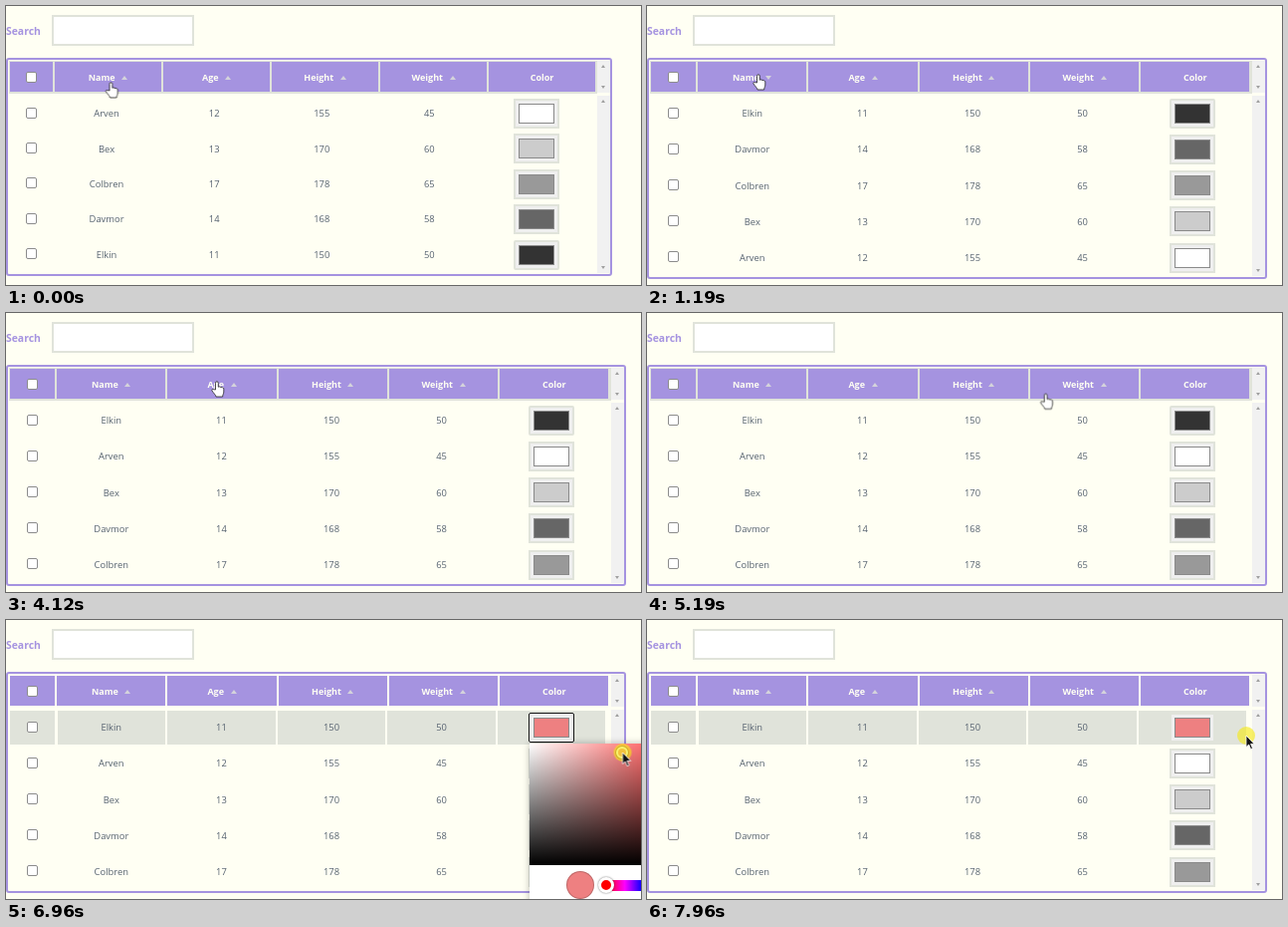
Animation of 638x280 px, one loop 8000 ms. Source, as an HTML page:

```html
<!DOCTYPE html>
<html lang="en">
<head>
<meta charset="utf-8">
<title>Sortable table</title>
<style>
  :root { --violet: #a593e0; --ivory: #fffff3; --mist: #e0e3da; --slate: #566270; }
  * { box-sizing: border-box; }
  html, body { margin: 0; width: 100%; height: 100%; overflow: hidden; background: var(--ivory); }
  #stage {
    --w: 609px; --h: 219px;
    --hs: 49px; --hp: 109px;
    --bs: 48px; --bp: 108.1px;
    --y: 91px; --rp: 35.4px;
    --pick: #333; --px: 0px; --py: 97px;
    position: relative; width: 638px; height: 280px; overflow: hidden;
    font: 9.4px/1 "Open Sans", "Noto Sans", sans-serif; color: var(--slate);
    animation: layout 8s step-end infinite, pick 8s step-end infinite;
  }
  #stage div, #stage svg, #stage i { position: absolute; }
  @keyframes layout {
    14.875% { --w: 622.5px; --h: 222px; --hs: 51px; --hp: 111.3px; --bs: 51.5px; --bp: 110.6px; --y: 91px; --rp: 36.15px; }
  }
  @keyframes pick { 87% { --pick: #ee8081; --px: 93px; --py: 9px; } }

  .label { left: 0; top: 17.5px; font-size: 10.4px; line-height: 14px; font-weight: 700; color: var(--violet); }
  .search { left: 46px; top: 9px; width: 143px; height: 31px; background: #fff; border: 2px solid var(--mist); }
  .frame { left: 0; top: 52px; width: var(--w); height: var(--h); border: 2px solid var(--violet); border-radius: 3px; }

  .head { left: 3px; top: 55px; width: calc(var(--w) - 18px); height: 33px; background: var(--mist);
    animation: leave 8s step-end infinite; }
  @keyframes leave { 66% { background: transparent; } }

  .cell { display: flex; align-items: center; justify-content: center; }
  .th { top: 56px; height: 30px; left: calc(var(--hs) + var(--hp) * var(--c)); width: calc(var(--hp) - 2px);
    background: var(--violet); color: var(--ivory); font-size: 9px; font-weight: 700; }
  .th.check, .td.check { left: 4px; width: calc(var(--hs) - 6px); }
  .th b { margin: 2px 0 0 6.5px; border: 3.5px solid transparent; border-top: 0; border-bottom: 4px solid var(--mist); opacity: .8; }
  .th.name b { animation: flip 8s step-end infinite; }
  @keyframes flip { 14.875% { transform: scaleY(-1); } 29% { transform: none; } }

  .row { --i: var(--a); left: 0; top: calc(var(--y) + var(--rp) * var(--i)); width: 100%; height: 34px;
    animation: sort 8s step-end infinite; }
  @keyframes sort { 14.875% { --i: var(--b); } 29% { --i: var(--a); } 51.5% { --i: var(--d); } }
  .td { top: 0; height: 34px; left: calc(var(--bs) + var(--bp) * var(--c)); width: calc(var(--bp) - 2px); }
  .last .td { animation: hover 8s step-end infinite; }
  @keyframes hover {
    66.25% { background: var(--mist); }
    94.5% { background: transparent; }
    95.8% { background: var(--mist); }
  }
  .box { width: 11px; height: 11px; background: #fff; border: 1px solid #8c8c8c; border-radius: 2px; }
  .td .box { margin-top: -2px; }
  .well { width: 46px; height: 30px; padding: 3px; background: #efefef; border: 2px solid var(--mist); flex: none; }
  .well span { display: block; height: 100%; border: 1px solid #8a8a8a; background: var(--k); }
  .last .well { border-radius: 2px; outline: 1.5px solid transparent; outline-offset: -1px; animation: focus 8s step-end infinite; }
  @keyframes focus {
    71.25% { outline-color: #101010; border-color: #fff; }
    99.5% { outline-color: transparent; border-color: var(--mist); }
  }

  .bar { left: calc(var(--w) - 15px); width: 13px; background: #f1f1f1; }
  .bar i { left: 4px; border: 2.5px solid transparent; }
  .bar .up { top: 4px; border-top: 0; border-bottom: 3px solid #a0a0a0; }
  .bar .down { bottom: 4px; border-bottom: 0; border-top: 3px solid #a0a0a0; }

  .popup { left: 526px; top: 124px; width: 202px; height: 260px; opacity: 0; box-shadow: 0 0 7px rgba(0, 0, 0, .28);
    animation: show 8s step-end infinite; }
  @keyframes show { 73.5% { opacity: 1; } 99.5% { opacity: 0; } }
  .panel { inset: 0; background: #fff; overflow: hidden; opacity: 0; animation: fill 8s step-end infinite; }
  @keyframes fill { 74.375% { opacity: 1; } }
  .shade { left: 0; top: 0; width: 202px; height: 122px; overflow: hidden;
    background: linear-gradient(transparent, #000), linear-gradient(90deg, #fff, #f00); }
  .ring { left: var(--px); top: var(--py); width: 12px; height: 12px; margin: -6px; border-radius: 50%;
    background: var(--pick); border: 2px solid #fff; box-shadow: 0 0 0 1px rgba(0, 0, 0, .4); }
  .dot { left: 37px; top: 128px; width: 28px; height: 28px; border-radius: 50%; background: var(--pick); border: 1px solid rgba(0, 0, 0, .2); }
  .hue { left: 77px; top: 137px; width: 110px; height: 11px; border-radius: 6px;
    background: linear-gradient(90deg, #f00, #f0f 17%, #00f 33%, #0ff 50%, #0f0 67%, #ff0 83%, #f00); }
  .knob { left: 69px; top: 134px; width: 16px; height: 16px; border-radius: 50%; background: #f00; border: 3px solid #fff;
    box-shadow: 0 0 2px rgba(0, 0, 0, .6); }

  .pointer { left: 0; top: 0; animation: move 8s linear infinite; }
  @keyframes move {
    0%, 2.25% { transform: translate(105.5px, 77px); }
    5% { transform: translate(158px, 83px); }
    7% { transform: translate(183px, 80px); animation-timing-function: ease-out; }
    11.75%, 33% { transform: translate(112px, 69px); animation-timing-function: ease-in-out; }
    35.875%, 36.75% { transform: translate(204px, 69px); animation-timing-function: ease-out; }
    40.75%, 61.5% { transform: translate(212px, 69px); animation-timing-function: ease-in; }
    64.5% { transform: translate(380px, 79px); }
    66% { transform: translate(460px, 88px); animation-timing-function: ease-out; }
    70.5%, 79.7% { transform: translate(557px, 109px); animation-timing-function: ease-out; }
    83%, 92.5% { transform: translate(619.5px, 133px); animation-timing-function: ease-in-out; }
    97.25%, 100% { transform: translate(602px, 116px); }
  }
  .click { left: -9px; top: -9px; width: 18px; height: 18px; border-radius: 50%; background: #f6ea14; opacity: 0;
    animation: click 8s step-end infinite; }
  @keyframes click {
    12.625%, 27.375%, 49.25%, 71.25%, 87%, 99.5% { opacity: .62; }
    14.875%, 29%, 51.5%, 73.5%, 88.5% { opacity: 0; }
  }
  .pointer svg { left: 0; top: 0; width: 1px; height: 1px; overflow: visible; stroke-linejoin: round; }
  .hand { animation: hide 8s step-end infinite; }
  .arrow { opacity: 0; animation: reveal 8s step-end infinite; }
  @keyframes hide { 66% { opacity: 0; } }
  @keyframes reveal { 66% { opacity: 1; } }
</style>
</head>
<body>
<div id="stage">
  <div class="label">Search</div>
  <div class="search"></div>
  <div class="frame"></div>
  <div class="head"></div>
  <section id="table"></section>
  <div class="bar" style="top:55px;height:32px"><i class="up"></i><i class="down"></i></div>
  <div class="bar" style="top:90px;height:calc(var(--h) - 41px)"><i class="up"></i><i class="down"></i></div>
  <div class="popup">
    <div class="panel">
      <div class="shade"><div class="ring"></div></div>
      <div class="dot"></div>
      <div class="hue"></div>
      <div class="knob"></div>
    </div>
  </div>
  <div class="pointer">
    <div class="click"></div>
    <svg class="hand"><path fill="#fff" stroke="#222" stroke-width=".8" d="M-1.5 8V1.2a1.4 1.4 0 0 1 2.8 0V5.2l1.2-.3 1.5.6 1.4.2 1.4.9V10c0 2-1 2.5-1.2 5H-1c-.3-2-2.6-3.6-4-6-.6-1.3.6-2 1.6-1.3z"/></svg>
    <svg class="arrow"><path fill="#111" stroke="#fff" stroke-width=".8" d="M0 0V11.5L2.7 9 4.6 13.6 6.5 12.8 4.6 8.4H8.2Z"/></svg>
  </div>
</div>
<script>
  const people = [
    ['Arven', 12, 155, 45, '#fff'],
    ['Bex', 13, 170, 60, '#ccc'],
    ['Colbren', 17, 178, 65, '#999'],
    ['Davmor', 14, 168, 58, '#666'],
    ['Elkin', 11, 150, 50, 'var(--pick)']
  ];
  const byAge = [...people].sort((p, q) => p[1] - q[1]);
  const box = '<span class="box"></span>';
  const cell = (type, col, content) => `<div class="cell ${type}" style="--c:${col}">${content}</div>`;

  const heads = ['Name', 'Age', 'Height', 'Weight', 'Color'].map((title, c) =>
    cell(c ? 'th' : 'th name', c, title + (c < 4 ? '<b></b>' : '')));

  const rows = people.map((person, i) => {
    const cells = person.map((value, c) =>
      cell('td', c, c < 4 ? value : `<span class="well"><span style="--k:${value}"></span></span>`));
    return `<div class="row ${i === 4 ? 'last' : ''}" style="--a:${i};--b:${4 - i};--d:${byAge.indexOf(person)}">` +
      cell('td check', 0, box) + cells.join('') + '</div>';
  });

  document.getElementById('table').innerHTML =
    cell('th check', 0, box) + heads.join('') + rows.join('');
</script>
</body>
</html>
```
